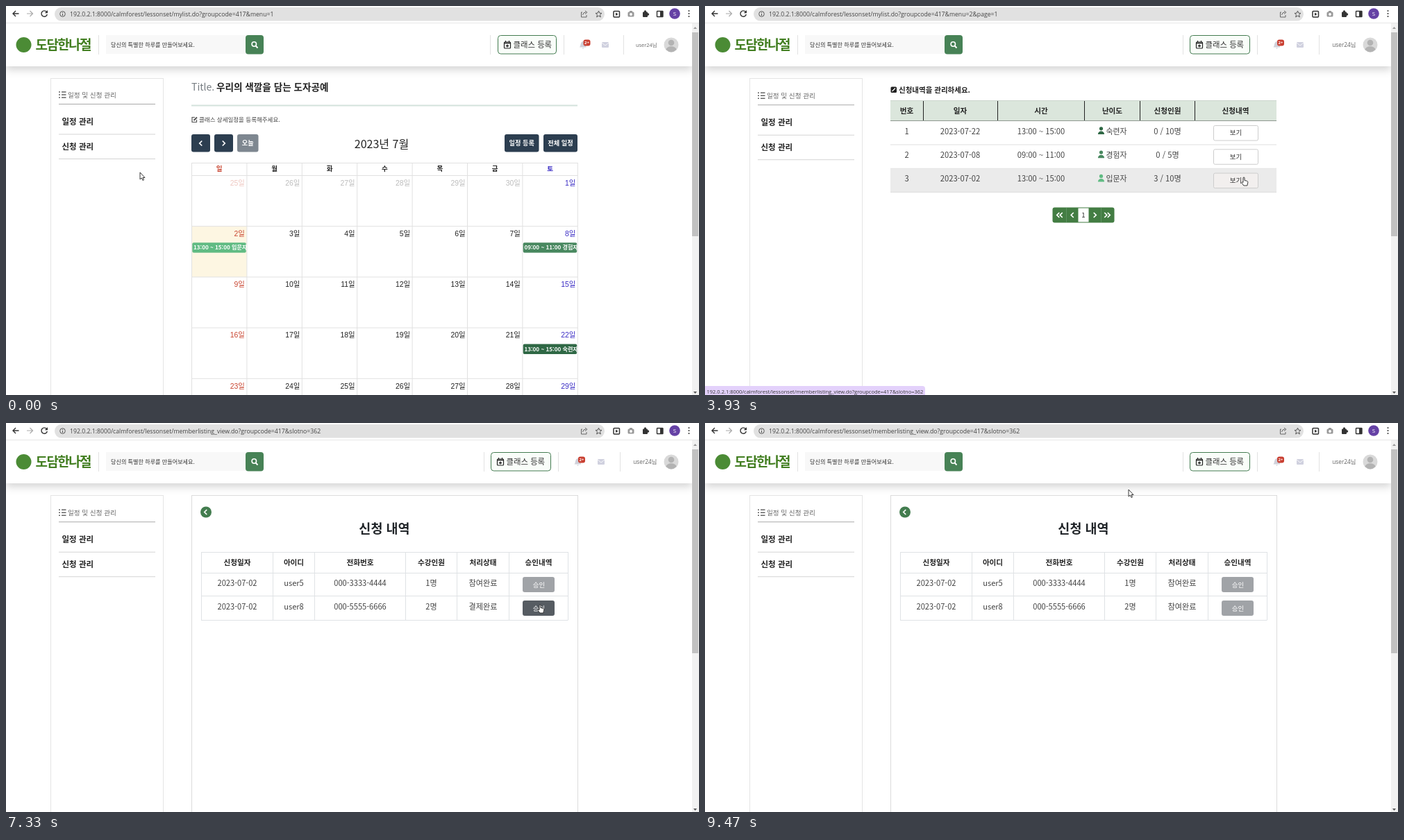
Recreate the animation shown at these times as an HTML page. Size 998x561 px, loop 9.54 s.

```html
<!DOCTYPE html>
<html lang="ko">
<head>
<meta charset="utf-8">
<title>클래스 일정 관리</title>
<style>
  html, body { margin: 0; width: 100%; height: 100%; overflow: hidden; background: #fff; }
  svg { display: block; width: 998px; height: 561px; font-family: "Noto Sans CJK KR", "Noto Sans CJK JP", "Noto Sans CJK", sans-serif; }
  text { white-space: pre; }
  .latin { font-family: "Open Sans", "Noto Sans CJK KR", "Noto Sans CJK JP", sans-serif; }
  .days { font-family: "Liberation Sans", "Noto Sans CJK KR", "Noto Sans CJK JP", sans-serif; }
  .bold { font-weight: 700; }
  .mid { text-anchor: middle; }
  .end { text-anchor: end; }
  .shadow { filter: drop-shadow(0 5px 6px rgba(0, 0, 0, .17)); }
  .dialog { filter: drop-shadow(0 2px 4px rgba(0, 0, 0, .4)); }
</style>
</head>
<body>
<svg id="stage" viewBox="0 0 998 561"></svg>
<script>
const LOOP = 9540;
const HOST = '192.0.2.1';
const BASE = HOST + ':8000/calmforest/lessonset/';
const URLS = [
  BASE + 'mylist.do?groupcode=417&menu=1',
  BASE + 'mylist.do?groupcode=417&menu=2&page=1',
  BASE + 'memberlisting_view.do?groupcode=417&slotno=362'
];
const WAITING = HOST + '의 응답을 기다리는 중...';
const GREEN = '#478256';
const LEVELS = { 입문자: '#60bb83', 경험자: '#48885f', 숙련자: '#2f6845' };

const text = (x, y, s, size, fill = '#333', cls = '', extra = '') =>
  `<text x="${x}" y="${y}" font-size="${size}" fill="${fill}" class="${cls}" ${extra}>${s}</text>`;
const box = (x, y, w, h, fill, r = 0, extra = '') =>
  `<rect x="${x}" y="${y}" width="${w}" height="${h}" rx="${r}" fill="${fill}" ${extra}/>`;
const line = (d, stroke, width = 1, extra = '') =>
  `<path d="${d}" fill="none" stroke="${stroke}" stroke-width="${width}" ${extra}/>`;
const shape = (d, fill, extra = '') => `<path d="${d}" fill="${fill}" ${extra}/>`;
const circle = (x, y, r, fill, extra = '') => `<circle cx="${x}" cy="${y}" r="${r}" fill="${fill}" ${extra}/>`;
const group = (id, body, extra = '') => `<g id="${id}" ${extra}>${body}</g>`;
const at = (x, y, body) => `<g transform="translate(${x} ${y})">${body}</g>`;
const chevron = (x, y, dir, s = 3.5, w = 1.7) =>
  line(`M${x - dir * s / 2} ${y - s}l${dir * s} ${s}l${-dir * s} ${s}`, '#fff', w);
const person = (x, y, fill) =>
  at(x, y, circle(0, -3.2, 2.6, fill) + shape('M-4.6 5C-4.6-1 4.6-1 4.6 5Z', fill));

function toolbar() {
  return box(0, 0, 998, 25, '#fff') + line('M0 24.5H998', '#e6e6e6') +
    box(70, 2, 792, 19.5, '#e1e1e1', 9.7) +
    line('M18.5 11H10M14 7L10 11L14 15', '#333', 1.4) +
    line('M30 11H38.5M34.5 7L38.5 11L34.5 15', '#aaa', 1.2) +
    group('reload', line('M58.4 8.3A4.2 4.2 0 1 0 59.3 12', '#333', 1.4) + shape('M60 6V10.2H55.8Z', '#333')) +
    group('stop', line('M51.5 7.5L59 15M59 7.5L51.5 15', '#333', 1.4)) +
    circle(81.5, 11.5, 3.8, 'none', 'stroke="#555"') + line('M81.5 11V14M81.5 9V10', '#555') +
    text(92, 15, '', 8.7, '#444', 'latin', 'id="url"') +
    line('M830 9H828.500V16H836V13M830.5 13Q831 9 835 9M834 7L837 9.200L834 11.500', '#666', 1) +
    shape('M853.500 7L854.800 10.200L858 10.400L855.500 12.600L856.300 16L853.500 14.100L850.700 16L851.500 12.600L849 10.400L852.200 10.200Z', 'none', 'stroke="#555"') +
    box(875, 7.500, 8.500, 8.500, 'none', 1, 'stroke="#333" stroke-width="1.5"') + shape('M878 9.500L881.500 11.800L878 14Z', '#333') +
    box(895.5, 8.500, 9, 7, '#999', 1.500) + box(898, 7, 4, 3, '#999') + circle(900, 12, 2, '#fff') +
    box(917, 8.500, 7, 7.500, '#333', 1) + circle(920.5, 8, 1.700, '#333') + circle(924.5, 12, 1.700, '#333') +
    box(937.5, 7.500, 8.500, 8, 'none', .5, 'stroke="#333" stroke-width="1.400"') + box(942, 7, 4, 9, '#333') +
    circle(963, 11, 7.800, '#6541a5') + text(963, 14, 'S', 8, '#fff', 'mid latin') +
    [7, 11, 15].map(y => circle(983.5, y, 1.1, '#444')).join('');
}

// Right side of the page header; its parts sit differently on the first page.
function account(id, x, width, bell, mail, name, size, dividers) {
  return group(id,
    line(dividers.map(d => `M${d}.5 42V70`).join(''), '#e2e2e2') +
    box(x + .5, 42.5, width, 26.500, '#f9fdf9', 4, 'stroke="#437b50"') +
    at(x + 14, 56, box(-4.500, -4, 9, 9, 'none', 1, 'stroke="#222" stroke-width="1.200"') +
      line('M-4.500-2.500H4.500M-2.500-6V-4M2.500-6V-4M-2 1.500H2M0-.5V3.500', '#222', 1.300)) +
    text(x + 22.500, 60, '클래스 등록', 11.400, '#333') +
    at(bell, 56, shape('M-5 3.500C-3 1-4-4.500 0-5C4-4.500 3 1 5 3.500ZM-1.500 4.500H1.500L0 6Z', '#d0d1da') +
      `<g class="badge">${box(.5, -7.500, 10, 9, '#c93f31', 3) + text(5.500, -.8, '2+', 6, '#fff', 'mid bold latin')}</g>`) +
    at(mail, 56, box(-5, -4, 10, 8, '#d0d1df', 1) + line('M-5-3L0 1L5-3', '#fff', .8)) +
    text(937.5, 59, name, size, '#666', 'end latin'));
}

function header() {
  return box(0, 25, 988, 62, '#fff', 0, 'class="shadow"') +
    circle(25.5, 56, 11, '#4b8b35') +
    text(42.500, 62.500, '도담한나절', 19, '#437f22', '', 'font-weight="900" letter-spacing="-1.600"') +
    line('M133.5 42V70', '#e2e2e2') +
    box(144, 42, 202, 27, '#f8f8f8') + text(151, 59.300, '당신의 특별한 하루를 만들어보세요.', 8.100) +
    box(345, 42, 26, 27.500, GREEN, 4) +
    circle(357.3, 55, 3.200, 'none', 'stroke="#fff" stroke-width="1.600"') + line('M359.600 57.500L362.500 60.500', '#fff', 1.800) +
    account('accountA', 708, 84, 831, 863, 'user24님', 7.400, [697, 803, 889]) +
    account('accountB', 698, 86, 823.5, 857, 'user24님', 8.300, [688, 795, 884]) +
    circle(958, 56, 10.500, '#d9d9d9') + circle(958, 53, 4.300, '#b3b3b3') +
    shape('M950.500 63C951 56.500 965 56.500 965.500 63Q958 70 950.500 63Z', '#b3b3b3');
}

function sidebar() {
  const dots = [124, 128, 132].map(y => `M76 ${y}H78M80 ${y}H86.500`).join('');
  return box(64.5, 104.5, 162, 470, 'none', 0, 'stroke="#e4e4e4"') +
    group('menu', line(dots, '#666', 1.500) + text(89, 131.500, '일정 및 신청 관리', 9.600, '#666') +
      line('M76 141.500H215', '#aaa') +
      text(80.500, 171, '일정 관리', 11.500, '#222', 'bold') + line('M76 185H215', '#d4d4d4') +
      text(80.500, 206.500, '신청 관리', 11.500, '#222', 'bold') + line('M76 220.500H215', '#d4d4d4'));
}

function calendar() {
  const colX = c => 267.5 + c * 79.4, rowY = r => 244.5 + r * 73.2;
  const tint = c => c === 0 ? '#c8442f' : c === 6 ? '#3a2cc4' : '#222';
  const button = (x, w, label, fill = '#2c3e50') =>
    box(x, 185, w, 25.500, fill, 3) + text(x + w / 2, 201, label, 9.200, '#fff', 'mid bold');
  const event = (c, r, hours, level) => box(colX(c) + .8, rowY(r) + 23.500, 77.500, 14.500, LEVELS[level], 2) +
    text(colX(c) + 2.500, rowY(r) + 33.700, `${hours} ${level}`, 8.100, '#fff', 'bold');
  let out = text(267, 122, 'Title.', 14, '#757b80') +
    text(303, 122, '우리의 색깔을 담는 도자공예', 13.600, '#222', 'bold') +
    line('M267 143.500H823', '#d3e2dc', 2) +
    line('M272 160.500H268V167.500H274.500V164', '#555', 1.200) + line('M270.500 165L275 160.500', '#555', 2) +
    text(278, 167, '클래스 상세일정을 등록해주세요.', 8.500, '#444') +
    button(267, 27, '') + button(300, 27, '') + chevron(280.5, 198, -1) + chevron(313.5, 198, 1) +
    button(333, 30.500, '오늘', '#7e8790') + button(718, 49.500, '일정 등록') + button(774, 49, '전체 일정') +
    text(541, 204.500, '2023년 7월', 16, '#222', 'mid') +
    box(colX(0), rowY(1), 79.400, 73.200, '#fdf6e2');
  let grid = 'M267.5 226.500H823.500';
  for (let r = 0; r < 5; r++) grid += `M267.5 ${rowY(r)}H823.5`;
  for (let c = 0; c < 8; c++) grid += `M${colX(c)} 226V561`;
  out += line(grid, '#e1e1e1');
  [...'일월화수목금토'].forEach((d, c) => out += text(colX(c) + 39.700, 237.800, d, 9.500, tint(c), 'mid bold'));
  for (let i = 0; i < 35; i++) {
    const c = i % 7, r = (i - c) / 7, day = i < 6 ? 25 + i : i - 5;
    out += text(colX(c + 1) - 3, rowY(r) + 14.300, day + '일', 10.400, tint(c), 'end days', i < 6 ? 'opacity=".3"' : '');
  }
  return out + event(0, 1, '13:00 ~ 15:00', '입문자') + event(6, 1, '09:00 ~ 11:00', '경험자') +
    event(6, 3, '13:00 ~ 15:00', '숙련자');
}

function unitList() {
  const centers = [290.5, 367.5, 484, 586.5, 666, 764];
  const heads = ['번호', '일자', '시간', '난이도', '신청인원', '신청내역'];
  const rows = [
    ['2023-07-22', '13:00 ~ 15:00', '숙련자', '0 / 10명'],
    ['2023-07-08', '09:00 ~ 11:00', '경험자', '0 / 5명'],
    ['2023-07-02', '13:00 ~ 15:00', '입문자', '3 / 10명']
  ];
  let out = box(267.5, 116.500, 8.500, 8.500, '#222', 1.500) + line('M269.500 123L274 118.500', '#fff', 1.300) +
    text(279, 124.700, '신청내역을 관리하세요.', 10.500, '#222', 'bold') +
    box(267, 136.500, 556, 29, '#dbe6dc') + line('M267 136.500H823', '#cbd5cd') + line('M267 165.500H823', '#8d978f') +
    line([314, 421, 546, 626, 705].map(x => `M${x}.5 137V165`).join(''), '#222');
  heads.forEach((h, i) => out += text(centers[i], 154.800, h, 10.600, '#222', 'mid bold'));
  rows.forEach(([date, hours, level, people], r) => {
    const y = 166 + r * 34.3;
    const cell = (i, s) => text(centers[i], y + 18.700, s, 11.200, '#444', 'mid');
    out += box(267, y, 556, 34.300, '#ebebeb', 0, 'class="hover"') + line(`M267 ${y + 34}H823`, '#dedede') +
      cell(0, r + 1) + cell(1, date) + cell(2, hours) + cell(4, people) +
      person(570.5, y + 14, LEVELS[level]) + text(577.500, y + 18.700, level, 10.900, '#444') +
      box(732.5, y + 6.500, 64, 21.500, '#fff', 2, 'stroke="#cdcdcd" class="view"') +
      text(764.5, y + 20.300, '보기', 9.500, '#333', 'mid');
  });
  return out + box(500.5, 290.500, 89, 22, '#437d43', 3) + box(537.5, 291.500, 15, 20, '#fff') +
    line('M520.500 291V312M570.500 291V312', '#5c9060') +
    chevron(508.5, 301.5, -1) + chevron(513, 301.5, -1) + chevron(529, 301.5, -1) +
    chevron(561.5, 301.5, 1) + chevron(577, 301.5, 1) + chevron(581.5, 301.5, 1) +
    text(545, 305, '1', 9.500, '#222', 'mid');
}

function applicants() {
  const edges = [281, 384, 444, 575, 649, 724, 809];
  const rows = [
    ['신청일자', '아이디', '전화번호', '수강인원', '처리상태', '승인내역'],
    ['2023-07-02', 'user5', '000-3333-4444', '1명', '참여완료'],
    ['2023-07-02', 'user8', '000-5555-6666', '2명', '결제완료']
  ];
  let out = box(267.5, 104.5, 556, 470, 'none', 0, 'stroke="#dcdcdc"') +
    circle(288, 128.500, 8, '#437d4f') + chevron(287.5, 128.5, -1) +
    text(545, 159, '신청 내역', 18.500, '#212529', 'mid bold') +
    line([186, 216, 249, 284].map(y => `M281 ${y}.5H809.500`).join('') +
      edges.map(x => `M${x}.5 186V284`).join(''), '#dfe2e5');
  rows.forEach((cells, r) => cells.forEach((s, i) => {
    const x = (edges[i] + edges[i + 1]) / 2 + .5, y = [205, 235, 268.5][r];
    out += text(x, y, s, r ? 11.1 : 10.6, r ? '#444' : '#222', r ? 'mid' : 'mid bold', r === 2 && i === 4 ? 'id="state"' : '');
  }));
  [222, 256].forEach((y, i) => out += box(744, y, 46, 22, '#a0a3a7', 3, i ? 'id="approve"' : '') +
    text(767.5, y + 14.500, '승인', 9.500, '#fff', 'mid'));
  return out;
}

function dialog() {
  return box(352.5, 21, 291.500, 94, '#25282d', 3, 'class="dialog"') +
    text(363, 45, HOST + ':8000 내용:', 9.600, '#eef0f2', 'latin') +
    text(363, 65.300, '승인이 완료되었습니다.', 9.200, '#dfe1e5') +
    box(592, 80, 42, 24, '#96b2f0', 3, 'stroke="#4468cb" stroke-width="2"') +
    box(593.5, 81.500, 39, 21, 'none', 2, 'stroke="#25282d" stroke-width=".8"') +
    text(613, 95, '확인', 8.500, '#27314a', 'mid');
}

const outline = 'stroke="#222" stroke-width=".9" stroke-linejoin="round"';
document.getElementById('stage').innerHTML =
  header() + sidebar() +
  group('page1', calendar()) + group('page2', unitList()) + group('page3', applicants()) +
  box(988, 25, 10, 536, '#f1f1f1') + box(988, 38, 9, 294, '#c1c1c1', 0, 'id="thumb"') +
  shape('M990 33L992.500 30L995 33Z', '#999') + shape('M990 556L992.500 559L995 556Z', '#555') +
  toolbar() +
  group('status', shape('', '#e3d1fb', 'id="statusBox"') + text(2.500, 558.500, '', 8, '#333', 'latin', 'id="statusText"')) +
  group('dialog', dialog()) +
  group('cursor',
    group('arrow', shape('M0 0V10L2.300 8L4 11.500L5.500 10.800L4 7.500H7Z', '#fff', outline)) +
    group('hand', shape('M-1 1C-1-.4 1-.4 1 1V4.500L4.500 5.300Q6 5.700 5.800 7.500L4.800 12H-.2L-3 8.200C-3.500 7-2 6.300-1 7.500Z', '#fff', outline)));

const ui = Object.fromEntries([...document.querySelectorAll('[id]')].map(el => [el.id, el]));
const all = selector => [...document.querySelectorAll(selector)];
const badges = all('.badge'), hovers = all('.hover'), views = all('.view');
const show = (el, on) => el.style.display = on ? '' : 'none';
const within = (t, from, to) => t >= from && t < to;
const ramp = (t, from, span) => Math.min(1, Math.max(0, (t - from) / span));

// Pointer stops: time, x, y
const PATH = [
  [70, 193, 240], [870, 114, 203], [2800, 114, 203], [3730, 776, 247], [5000, 776, 247],
  [5670, 641, 189], [5930, 634, 186], [6800, 769, 262], [7600, 769, 262],
  [7930, 663, 188], [8470, 610, 94], [9400, 610, 94], [9470, 610, 96]
];

function pointer(t) {
  const i = PATH.findIndex(stop => stop[0] > t);
  if (i < 1) return PATH[i ? PATH.length - 1 : 0].slice(1);
  const [t0, x0, y0] = PATH[i - 1], [t1, x1, y1] = PATH[i];
  const k = (t - t0) / (t1 - t0), e = k * k * (3 - 2 * k);
  return [x0 + (x1 - x0) * e, y0 + (y1 - y0) * e];
}

function render(t) {
  const page = t < 2070 ? 1 : t < 5870 ? 2 : 3;
  const frozen = within(t, 5000, 5870);
  const loading = within(t, 930, 2470) || within(t, 5070, 6400);
  const waiting = within(t, 930, 2800) || within(t, 5070, 6400);
  const linking = within(t, 3800, 5070);
  const [x, y] = pointer(t);

  for (const n of [1, 2, 3]) show(ui['page' + n], n === page);
  show(ui.accountA, page === 1);
  show(ui.accountB, page !== 1);
  ui.menu.setAttribute('transform', `translate(0 ${page === 1 ? 0 : 1.2})`);
  badges.forEach(b => show(b, !within(t, 2070, 2870) && !within(t, 5870, 6400)));
  ui.thumb.setAttribute('height', within(t, 2070, 2470) ? 421 : 294);

  show(ui.stop, loading);
  show(ui.reload, !loading);
  ui.url.textContent = URLS[t < 1800 ? 0 : t < 5330 ? 1 : 2];
  show(ui.status, waiting || linking);
  ui.status.style.opacity = linking ? ramp(t, 3740, 190) : 1;
  ui.statusText.textContent = linking ? URLS[2] : WAITING;
  ui.statusText.setAttribute('font-size', linking ? 7.5 : 8);
  ui.statusBox.setAttribute('d', `M0 548H${linking ? 313 : 327}q4 0 4 4V561H0Z`);

  const row = frozen ? 2 : within(x, 267, 823) ? Math.floor((y - 166) / 34.3) : -1;
  const onView = frozen || (row >= 0 && row < 3 && within(x, 732, 797));
  hovers.forEach((h, i) => show(h, i === row));
  views.forEach((v, i) => v.setAttribute('fill', i === row ? '#f2efee' : '#fff'));

  const onApprove = within(x, 744, 790) && within(y, 256, 278);
  const done = t >= 8740;
  ui.approve.setAttribute('fill', done ? '#a0a3a7' : onApprove ? '#565c62' : '#696f75');
  ui.state.textContent = done ? '참여완료' : '결제완료';
  const alpha = ramp(t, 7540, 130) - ramp(t, 8600, 130);
  show(ui.dialog, alpha > 0);
  ui.dialog.style.opacity = alpha;

  const onMenu = within(x, 80, 126) && within(y, 195, 212);
  const pointing = onMenu || (page === 2 && onView) || (page === 3 && onApprove && t < 7600);
  show(ui.hand, pointing);
  show(ui.arrow, !pointing);
  ui.cursor.setAttribute('transform', `translate(${x.toFixed(1)} ${y.toFixed(1)})`);
}

function tick() {
  const t = performance.now() % LOOP;
  render(Math.floor((t + 5) * .015) / .015 + 5);
  requestAnimationFrame(tick);
}
tick();
</script>
</body>
</html>
```
